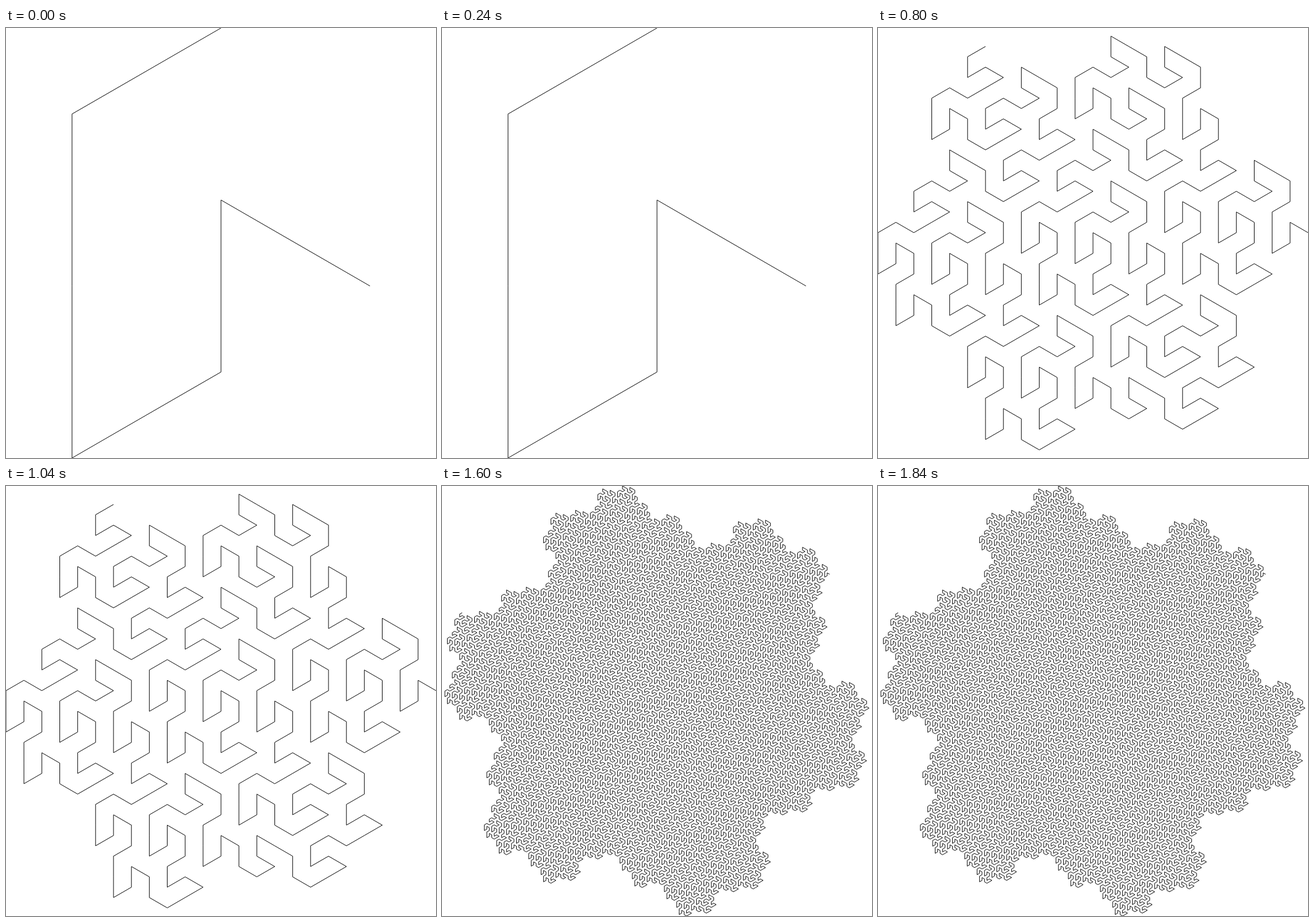
Recreate the animation shown at these times as an HTML page. Size 748 by 748 pixels, loop 2000 ms.

```html
<!DOCTYPE html>
<html lang="en">
<head>
<meta charset="utf-8">
<title>Gosper curve</title>
<style>
  html, body { margin: 0; width: 100%; height: 100%; overflow: hidden; background: #fff; }
  svg { display: block; width: 100vw; height: 100vh; }
  path { fill: none; stroke: #000; stroke-width: 1; visibility: hidden; animation: show 2s step-end infinite; }
  @keyframes show {
    0% { visibility: visible; }
    20%, 100% { visibility: hidden; }
  }
</style>
</head>
<body>
<svg viewBox="0 0 748 748"></svg>
<script>
const SIZE = 748;
const LEVELS = 5;
const STEP_SECONDS = 0.4;
const RULES = { A: 'A-B--B+A++AA+B-', B: '+A-BB--B-A++A+B' };
const svg = document.querySelector('svg');

const grow = word => word.replace(/[AB]/g, symbol => RULES[symbol]);

// One point per segment start, so the closing segment stays open.
function trace(word) {
  const points = [];
  let x = 0, y = 0, turn = 0;
  for (const symbol of word) {
    if (symbol === '+') turn++;
    else if (symbol === '-') turn--;
    else {
      points.push([x, y]);
      const angle = Math.PI / 2 + turn * Math.PI / 3;
      x += Math.cos(angle);
      y += Math.sin(angle);
    }
  }
  return points;
}

function range(points, axis) {
  const values = points.map(p => p[axis]);
  const min = values.reduce((a, b) => Math.min(a, b));
  const max = values.reduce((a, b) => Math.max(a, b));
  return { middle: (min + max) / 2, length: max - min };
}

// Scale to the stage and centre.
function fit(points) {
  const spans = [range(points, 0), range(points, 1)];
  const scale = SIZE / Math.max(spans[0].length, spans[1].length);
  return points.map(p => p.map((v, axis) =>
    (SIZE / 2 + (v - spans[axis].middle) * scale).toFixed(3)));
}

let word = 'B';
for (let level = 0; level < LEVELS; level++) {
  word = grow(word);
  const path = document.createElementNS(svg.namespaceURI, 'path');
  path.setAttribute('d', 'M' + fit(trace(word)).join('L'));
  path.style.animationDelay = `${(level - LEVELS) * STEP_SECONDS}s`;
  svg.append(path);
}
</script>
</body>
</html>
```
